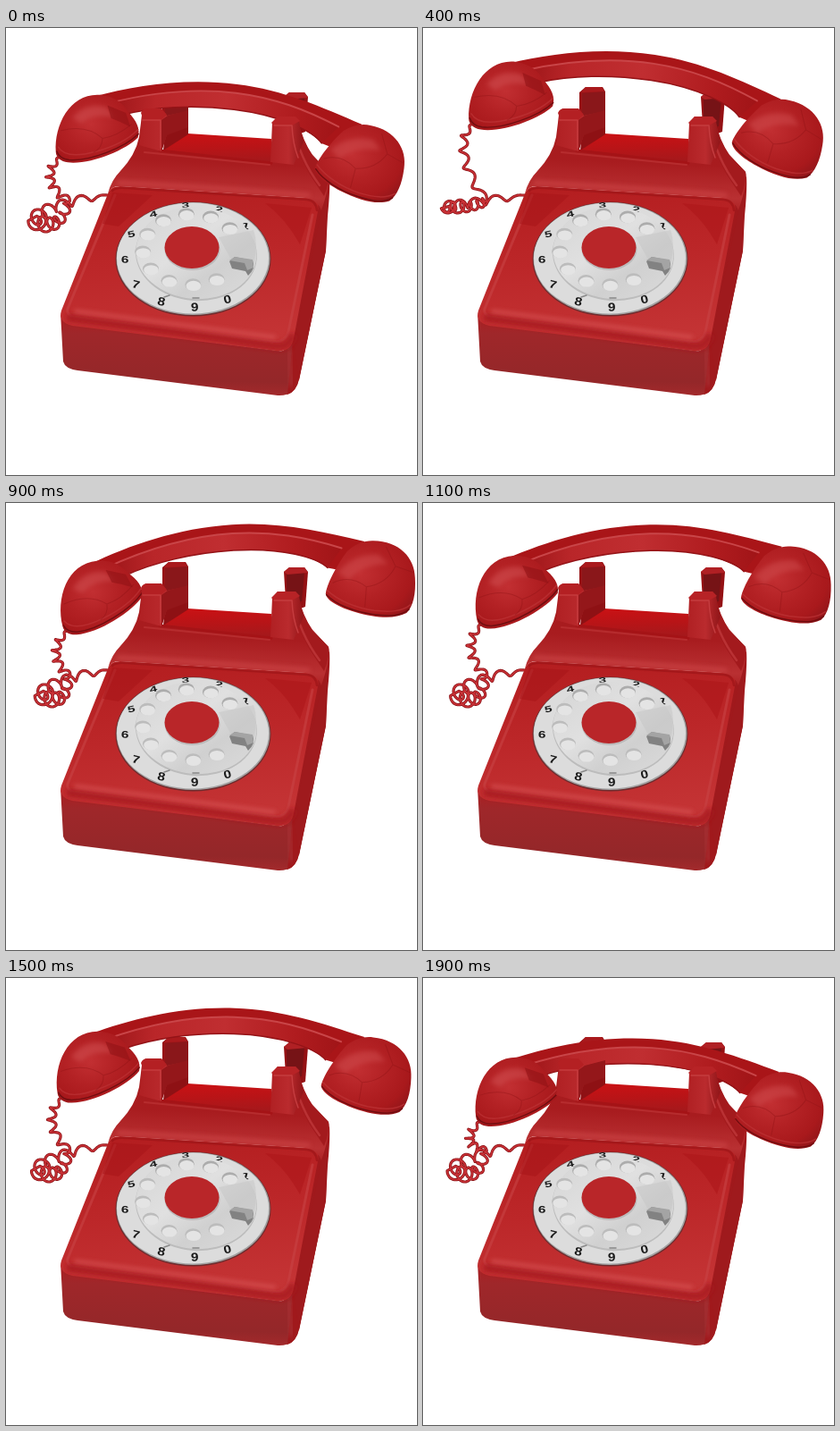
Write an HTML page that moves like this. It is 460 px wide and 500 px high and loops after 2.9 s.

```html
<!DOCTYPE html>
<html lang="en">
<head>
<meta charset="utf-8">
<title>Ringing telephone</title>
<style>
html, body { margin: 0; width: 100%; height: 100%; overflow: hidden; background: #fff; }
svg { display: block; width: 460px; height: 500px; }
#digits text { font: bold 14px Arial, "Liberation Sans", sans-serif; text-anchor: middle; dominant-baseline: central; fill: #1b1b1b; }
.line { fill: none; stroke-linecap: round; stroke-linejoin: round; }
</style>
</head>
<body>
<svg viewBox="0 0 460 500">
  <defs>
    <radialGradient id="cup" cx=".4" cy=".42" r=".7">
      <stop offset="0" stop-color="#c22f32"/><stop offset=".45" stop-color="#b32124"/>
      <stop offset=".8" stop-color="#a9191c"/><stop offset="1" stop-color="#94161a"/>
    </radialGradient>
    <linearGradient id="grip" x2="1" y2="0">
      <stop offset="0" stop-color="#9c1518"/><stop offset=".2" stop-color="#b92629"/>
      <stop offset=".5" stop-color="#c02e31"/><stop offset=".8" stop-color="#b01c1f"/><stop offset="1" stop-color="#a01417"/>
    </linearGradient>
    <linearGradient id="floor" x2=".1" y2="1">
      <stop offset="0" stop-color="#cb1114"/><stop offset=".5" stop-color="#b81417"/><stop offset="1" stop-color="#a3191c"/>
    </linearGradient>
    <linearGradient id="slope" x1=".1" y1="0" x2="0" y2="1">
      <stop offset="0" stop-color="#a81a1c"/><stop offset=".45" stop-color="#a81c1f"/>
      <stop offset=".78" stop-color="#b93032"/><stop offset="1" stop-color="#a4191b"/>
    </linearGradient>
    <linearGradient id="deck" x1=".1" y1="0" x2=".25" y2="1">
      <stop offset="0" stop-color="#b31d1f"/><stop offset=".5" stop-color="#bc2729"/><stop offset="1" stop-color="#c43435"/>
    </linearGradient>
    <linearGradient id="front" x1="0" y1="0" x2="-.04" y2="1">
      <stop offset="0" stop-color="#ae1d20"/><stop offset=".25" stop-color="#9f272a"/>
      <stop offset=".8" stop-color="#942729"/><stop offset="1" stop-color="#a62a2c"/>
    </linearGradient>
    <linearGradient id="side" x2="1" y2=".2">
      <stop offset="0" stop-color="#aa2225"/><stop offset=".5" stop-color="#9f1a1d"/><stop offset="1" stop-color="#a1181b"/>
    </linearGradient>
    <linearGradient id="post" x2="1" y2="0">
      <stop offset="0" stop-color="#b02023"/><stop offset=".55" stop-color="#ba2b2e"/><stop offset="1" stop-color="#8f1518"/>
    </linearGradient>
    <linearGradient id="plate" x1="0" y1="0" x2="1" y2=".9">
      <stop offset="0" stop-color="#d4d4d4"/><stop offset=".45" stop-color="#e0e0e0"/>
      <stop offset=".7" stop-color="#d0d0d0"/><stop offset="1" stop-color="#dadada"/>
    </linearGradient>
    <filter id="soft" x="-20%" y="-60%" width="140%" height="220%"><feGaussianBlur stdDeviation="2.5"/></filter>
  </defs>

  <g class="line">
    <path id="cordDark" stroke="#8e1418" stroke-width="3.2"/>
    <path id="cordLight" stroke="#cc3338" stroke-width="1.5"/>
  </g>

  <!-- rear cradle posts -->
  <path d="M175 72L182 66H201L204 71V119L175 130Z" fill="#971417"/>
  <path d="M178 73L203 71L204 117L178 112Z" fill="#8a171a"/>
  <path d="M177 72L182 66H200L203 71L181 72Z" fill="#a91a1d"/>
  <path d="M311 77L317 72H334L338 77L335 116L314 124Z" fill="#941114"/>
  <path d="M314 79L334 78L331 110L314 112Z" fill="#761316"/>
  <path d="M311 77L317 72H334L338 78L315 80Z" fill="#b02024"/>

  <!-- base -->
  <path d="M345 181L362 166Q363 180 360 210L358 249L328 392Q326 405 314 410L310 350Z" fill="url(#side)"/>
  <path d="M61 318Q62 326 70 331L305 361Q318 363 322 349L327 392Q325 412 304 411L80 383Q66 381 64 373Z" fill="url(#front)"/>
  <path d="M321 350L358 247L328 393Q325 407 315 410Z" fill="#a0191c"/>
  <path d="M322 352L353 205L360 182L358 249L328 394Z" fill="#9f1a1d"/>
  <path class="line" d="M316 362L320 398" stroke="#a83235" stroke-width="8" opacity=".6" filter="url(#soft)"/>
  <path d="M115 183Q118 177 128 177L338 190Q352 192 349 205L322 347Q319 363 302 361L74 333Q58 329 62 316Z" fill="url(#deck)"/>
  <path class="line" d="M122 187L69 314Q67 322 80 324L298 351Q312 352 316 340L343 209" stroke="#c84345" stroke-width="3" opacity=".6"/>
  <path class="line" d="M72 324Q150 334 303 356Q316 357 320 346" stroke="#a4171a" stroke-width="9" opacity=".75" filter="url(#soft)"/>
  <path class="line" d="M78 317Q190 332 300 346" stroke="#d95759" stroke-width="4" opacity=".75" filter="url(#soft)"/>
  <path d="M119 184L164 187L126 222L108 219Z" fill="#a81518" opacity=".55"/>
  <path d="M290 196L342 201L329 242Q313 213 290 196Z" fill="#ad171a" opacity=".6"/>

  <!-- cradle and slope -->
  <path d="M175 137L203 118L297 124V153Z" fill="url(#floor)"/>
  <path d="M178 118L204 110V119L176 137Z" fill="#8e1114"/>
  <path d="M152 98L174 105L175 136L297 150L300 108L327 103Q331 125 342 141L361 161Q364 172 353 204Q349 193 335 190L126 177Q118 177 114 185Q118 170 128 160Q145 142 149 122Z" fill="url(#slope)"/>
  <path d="M327 104Q332 126 343 142L361 161Q363 170 356 188L340 164Q326 140 321 112Z" fill="#a31a1d"/>
  <path class="line" d="M322 110Q328 145 351 176" stroke="#c84144" stroke-width="2.5" opacity=".6"/>
  <path class="line" d="M172 137L297 151" stroke="#a51316" stroke-width="3"/>
  <path class="line" d="M155 139L295 153" stroke="#c0373a" stroke-width="2" opacity=".6"/>
  <path class="line" d="M126 173Q225 178 338 187" stroke="#cf4648" stroke-width="5" opacity=".65" filter="url(#soft)"/>
  <path class="line" d="M119 182Q123 178 135 179L337 192Q347 193 348 204" stroke="#9d1417" stroke-width="2.5" opacity=".7"/>

  <!-- dial -->
  <ellipse cx="209.5" cy="258.5" rx="87" ry="64" fill="#6e2c2e"/>
  <ellipse cx="209.5" cy="258" rx="86" ry="63" fill="#a2a2a2"/>
  <ellipse cx="209" cy="257.5" rx="85" ry="62" fill="#dcdcdc"/>
  <g id="digits"></g>
  <g transform="rotate(4 212 252)">
    <ellipse cx="213" cy="253" rx="68" ry="52" fill="#bcbcbc"/>
    <ellipse cx="213" cy="251.5" rx="67.5" ry="51.5" fill="url(#plate)"/>
  </g>
  <path d="M238 234L277 226Q283 242 277 263L252 259Z" fill="#c5c5c5" opacity=".5"/>
  <g id="holes"></g>
  <path d="M177 301l6-2M209 302h7" class="line" stroke="#888" stroke-width="1.5"/>
  <ellipse cx="208.5" cy="247.500" rx="31" ry="23.500" fill="#bbb"/>
  <ellipse cx="208" cy="245.5" rx="30.5" ry="23.5" fill="#b92629"/>
  <path d="M250 261L256 256L276 260Q280 269 271 277L268 272L253 269Z" fill="#828282"/>
  <path d="M250 260L256 256L276 259L277 268L270 271L267 263Z" fill="#a4a4a4"/>

  <!-- handset, centred between its two cups -->
  <g id="handset">
    <path d="M-161 -38C-116 -56 -61 -72 0 -72C54 -72 99 -58 147 -44L131 -10L104 -17C93 -29 55 -43 0 -43C-46 -43 -91 -35 -125 -22Z" fill="#a91518"/>
    <path d="M-143 -31C-101 -48 -51 -62 0 -62C44 -62 81 -53 122 -39L104 -17C93 -29 55 -43 0 -43C-46 -43 -91 -35 -125 -22Z" fill="url(#grip)"/>
    <path class="line" d="M-145 -32C-101 -49 -51 -62 0 -62C44 -62 81 -53 121 -38" stroke="#c94548" stroke-width="2"/>
    <path class="line" d="M-124 -22C-91 -35 -46 -43 0 -43C55 -43 93 -29 104 -17" stroke="#941317" stroke-width="1.5"/>

    <g transform="translate(-151)">
      <path d="M-45 30C-51 -2 -36 -40 -2 -41C14 -41 24 -35 31 -26C42 -17 48 -8 46 2C34 18 -5 40 -30 40C-38 40 -44 36 -45 30Z" fill="url(#cup)"/>
      <path class="line" d="M-44 29C-41 35 -35 37 -29 37C-5 36 33 15 46 -2" stroke="#720d10" stroke-width="1.5"/>
      <path class="line" d="M-43 24C-36 33 -22 33 0 24C20 16 36 5 45 -7" stroke="#be3437" stroke-width="1.5" opacity=".7"/>
      <path d="M-31 -11Q-18 -31 6 -28L17 -17Q-8 -20 -20 -6Z" fill="#d65a5c" opacity=".42" filter="url(#soft)"/>
      <path class="line" d="M-42 5Q-14 -6 6 8Q22 4 37 -12M6 8Q7 19 -2 25" stroke="#8d1215" opacity=".4"/>
      <path d="M7 -30L29 -24L36 -9Q22 -14 13 -16Z" fill="#911316" opacity=".6"/>
    </g>

    <g transform="translate(151)">
      <path d="M-51 12C-48 -2 -34 -22 -24 -34C-14 -42 -4 -45 6 -44C35 -42 51 -22 50 0C50 18 46 32 38 39C24 45 5 43 -20 34C-36 28 -50 20 -51 12Z" fill="url(#cup)"/>
      <path class="line" d="M-50 13C-40 25 -20 34 0 38C20 42 32 42 41 35" stroke="#720d10" stroke-width="1.5"/>
      <path class="line" d="M-49 8C-38 20 -18 30 2 34C20 37 33 37 43 30" stroke="#be3437" stroke-width="1.5" opacity=".7"/>
      <path d="M-36 -11Q-16 -31 11 -28L21 -17Q-8 -19 -24 -2Z" fill="#d45557" opacity=".42" filter="url(#soft)"/>
      <path class="line" d="M-42 0Q-22 -8 -5 7Q18 5 29 -14L48 -6M-5 7L-8 29M29 -14L20 -36" stroke="#8d1215" opacity=".4"/>
    </g>
  </g>

  <!-- front cradle posts -->
  <path d="M152 95Q153 90 159 90H172L180 98L204 93V108L180 119L174 138L149 131Q152 112 152 95Z" fill="url(#post)"/>
  <path d="M174 103L181 98L204 92V111L180 120L174 138Z" fill="#94171a"/>
  <path d="M151 95Q153 90 159 90H174L180 97L173 103H154Z" fill="#b42023"/>
  <path class="line" d="M153 103H173V134" stroke="#c53b3e" stroke-width="1.5"/>
  <path d="M298 106L304 99H324L328 104Q329 116 333 127L322 153L296 150Z" fill="url(#post)"/>
  <path d="M297 106L304 99H324L329 104L320 109H300Z" fill="#b72326"/>
  <path class="line" d="M300 109H320Q321 130 327 145" stroke="#c53c3f" stroke-width="1.5"/>
</svg>

<script>
const $ = id => document.getElementById(id);
const LOOP = 2900, STEP = 100, LAST = 19, REST = 18;
const RAD = Math.PI / 180;

const mix = (a, b, k) => a + (b - a) * k;
const quad = (a, c, b, t) => mix(mix(a, c, t), mix(c, b, t), t);

// The handset hops up and back; every other step it swings to the right.
function poseAt(n) {
  const swing = n % 2;
  const lift = Math.max(-.15, 1 - Math.abs(2 * n / REST - 1) ** 3.4);
  const sway = swing ? 13.4 * Math.min(n / 7, Math.exp((7 - n) / 8.5)) : -1.8 * lift;
  return {
    x: 250 + .68 * sway,
    y: 133 - 37 * lift,
    angle: 7 - sway,
    size: mix(.98, 1, lift),
    sway,
    slack: swing ? 1 : 1 - lift
  };
}

// A coil wound along three curves: down from the cup, round the slack loop, into the base.
function cordPath(sx, sy, { sway, slack }) {
  const tx = 25 + 6 * slack + .7 * sway, ty = 198 + 18 * slack;
  const bend = [70, 194], tip = [tx, ty], end = [117, 187];
  const parts = [
    [[sx, sy], [sx - 28, sy + 26], bend],
    [bend, [tx + 30, ty + 14 * slack], tip],
    [tip, [tx + 12, ty - 20 * slack], end]
  ];
  let d = "";
  for (let i = 0; i <= 360; i++) {
    const p = i / 120, s = Math.min(2, Math.floor(p)), t = p - s;
    const [a, c, b] = parts[s];
    const [x, y] = [0, 1].map(j => quad(a[j], c[j], b[j], t));
    const [vx, vy] = [0, 1].map(j => mix(c[j] - a[j], b[j] - c[j], t));
    const len = Math.hypot(vx, vy) || 1;
    const bulge = Math.exp(-(((p - 1.9) / .5) ** 2));
    const r = mix(4.5, 6 + 2.5 * slack, bulge) * Math.min(1, p * 5, (3 - p) * 5);
    const phi = p * Math.PI * 10;
    const along = r * mix(.35, .8, bulge) * Math.cos(phi), across = r * Math.sin(phi);
    const px = x + (vx * along - vy * across) / len, py = y + (vy * along + vx * across) / len;
    d += `${i ? "L" : "M"}${px.toFixed(1)} ${py.toFixed(1)}`;
  }
  return d;
}

function draw(n) {
  const pose = poseAt(n), { x, y, angle, size } = pose;
  $("handset").setAttribute("transform", `translate(${x} ${y}) rotate(${angle}) scale(${size})`);
  const c = Math.cos(angle * RAD) * size, s = Math.sin(angle * RAD) * size;
  const d = cordPath(x - 190 * c - 34 * s, y - 190 * s + 34 * c, pose);
  for (const id of ["cordDark", "cordLight"]) $(id).setAttribute("d", d);
}

// Digits and finger holes share the same ten directions, from 0 clockwise to 1.
for (let i = 0; i < 10; i++) {
  const a = (58 + 29.5 * i) * RAD, c = Math.cos(a), s = Math.sin(a);
  const hx = 207 + 54 * c, hy = 247.5 + 39.5 * s;
  $("digits").innerHTML += `<text transform="translate(${208 + 75 * c} ${255 + 57 * s})
    rotate(${-32 * c * s}) scale(1.1 ${.78 + .17 * s})">${(10 - i) % 10}</text>`;
  $("holes").innerHTML += `<ellipse cx="${hx}" cy="${hy}" rx="9" ry="6.8" fill="${s < -.5 ? "#acacac" : "#bcbcbc"}"/>
    <ellipse cx="${hx + .5}" cy="${hy + 1.5}" rx="8.3" ry="5.6" fill="#e4e4e4"/>`;
}

let shown = -1;
function tick() {
  const n = Math.min(LAST, Math.floor(performance.now() % LOOP / STEP));
  if (n !== shown) draw(shown = n);
  requestAnimationFrame(tick);
}
tick();
</script>
</body>
</html>
```
